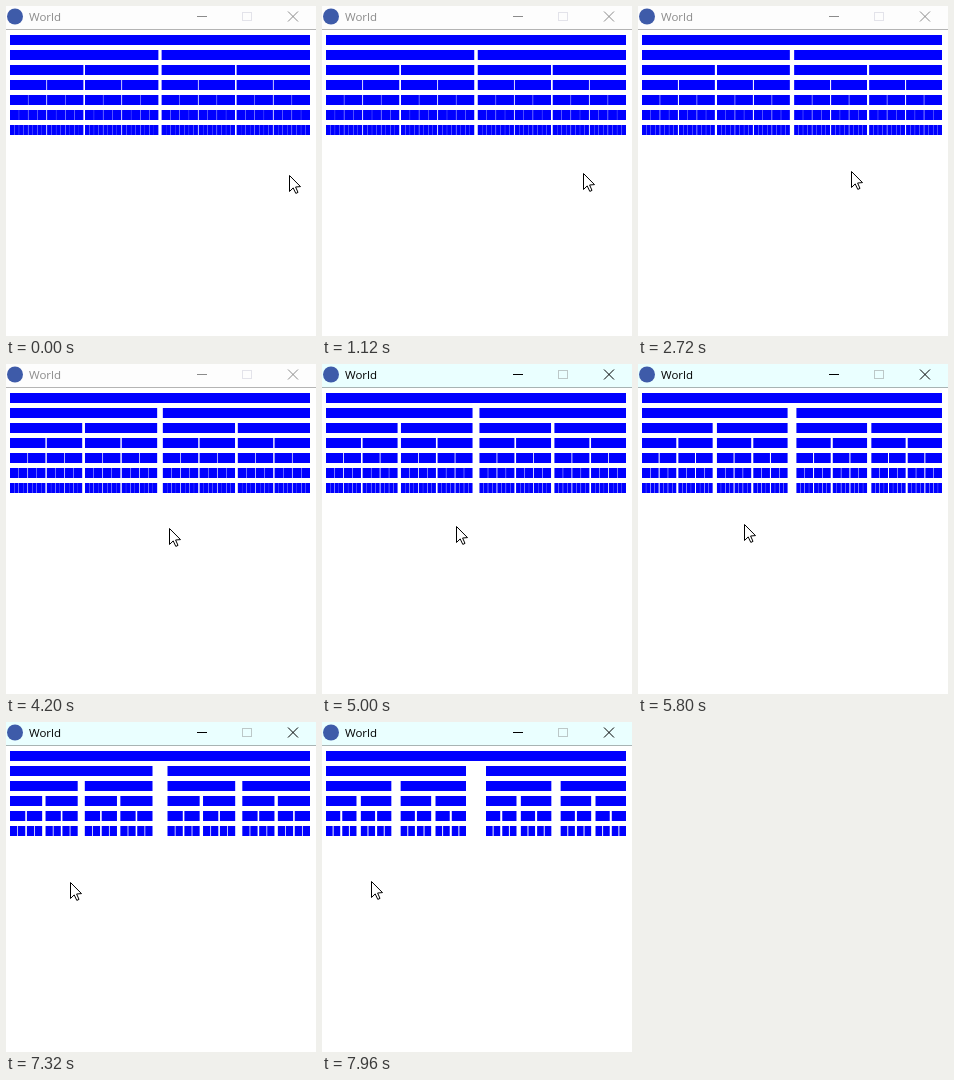
These frames come from a looping animation (310x330 px, 8000 ms). An HTML page with a canvas:

```html
<!DOCTYPE html>
<html lang="en">
<head>
<meta charset="utf-8">
<title>World</title>
<style>
html, body { margin: 0; width: 100%; height: 100%; overflow: hidden; background: #fff; }
canvas { display: block; }
</style>
</head>
<body>
<canvas id="stage" width="310" height="330"></canvas>
<script>
const ctx = document.getElementById('stage').getContext('2d');
const LOOP = 8000, STEP = 40, ACTIVATED = 5000;
const BAR = { left: 4, top: 29, width: 300, height: 10, pitch: 15, minWidth: 3.8 };

// Pointer path: time, x, y
const path = [
  [0, 283, 169], [2040, 240, 165], [2720, 213, 165], [4200, 163, 164],
  [5800, 106, 160], [6680, 80, 160], [7960, 49, 159]
];

function slope(i, axis) {
  const a = path[Math.max(i - 1, 0)], b = path[Math.min(i + 1, path.length - 1)];
  return (b[axis] - a[axis]) / (b[0] - a[0]);
}

// Cubic Hermite interpolation along the path
function pointerAt(t, axis) {
  let i = 0;
  while (i < path.length - 2 && t > path[i + 1][0]) i++;
  const [a, b] = [path[i], path[i + 1]];
  const span = b[0] - a[0], u = Math.min((t - a[0]) / span, 1), v = 1 - u;
  return v * v * (1 + 2 * u) * a[axis] + u * u * (3 - 2 * u) * b[axis]
    + span * u * v * (v * slope(i, axis) - u * slope(i + 1, axis));
}

function line(points, color, fill) {
  ctx.beginPath();
  points.forEach(([x, y]) => ctx.lineTo(x, y));
  if (fill) {
    ctx.closePath();
    ctx.fillStyle = fill;
    ctx.fill();
  }
  ctx.strokeStyle = color;
  ctx.lineWidth = 1;
  ctx.stroke();
}

function drawTitleBar(active) {
  const ink = active ? '#000' : '#8b8b8b';
  ctx.fillStyle = active ? '#eaffff' : '#fdfdfd';
  ctx.fillRect(0, 0, 310, 23);
  line([[0, 23.5], [310, 23.5]], active ? '#a8b4b4' : '#b4b4b4');

  ctx.fillStyle = '#3e5ba9';
  ctx.beginPath();
  ctx.arc(9, 10.5, 8, 0, 2 * Math.PI);
  ctx.fill();

  ctx.fillStyle = ink;
  ctx.font = '11.5px "Open Sans", "Noto Sans", sans-serif';
  ctx.fillText('World', 23, 15);

  line([[191, 10.5], [201, 10.5]], ink);
  ctx.strokeStyle = active ? '#bcc8c8' : '#e3e3ea';
  ctx.strokeRect(236.5, 6.5, 9, 8);
  line([[282, 5.5], [292, 15.5]], ink);
  line([[292, 5.5], [282, 15.5]], ink);
}

function drawCantor(x, y, width, ratio) {
  if (width < BAR.minWidth) return;
  ctx.fillRect(x, y, width, BAR.height);
  const child = width * (1 - ratio) / 2;
  drawCantor(x, y + BAR.pitch, child, ratio);
  drawCantor(x + width - child, y + BAR.pitch, child, ratio);
}

function drawPointer(x, y) {
  ctx.save();
  ctx.translate(x, y);
  line([[.5, .5], [.5, 16.5], [4.2, 12.9], [6.8, 18.4], [9, 17.4],
    [6.6, 12], [11.5, 11.6]], '#000', '#fff');
  ctx.restore();
}

function draw(now) {
  const t = Math.floor(now % LOOP / STEP) * STEP;
  const x = Math.round(pointerAt(t, 1)), y = Math.round(pointerAt(t, 2));
  ctx.fillStyle = '#fff';
  ctx.fillRect(0, 0, 310, 330);
  drawTitleBar(t >= ACTIVATED);
  ctx.fillStyle = '#00f';
  drawCantor(BAR.left, BAR.top, BAR.width, 3 / (x - BAR.left));
  drawPointer(x, y);
}

const start = performance.now();
function tick() {
  draw(performance.now() - start);
  requestAnimationFrame(tick);
}
tick();
</script>
</body>
</html>
```
